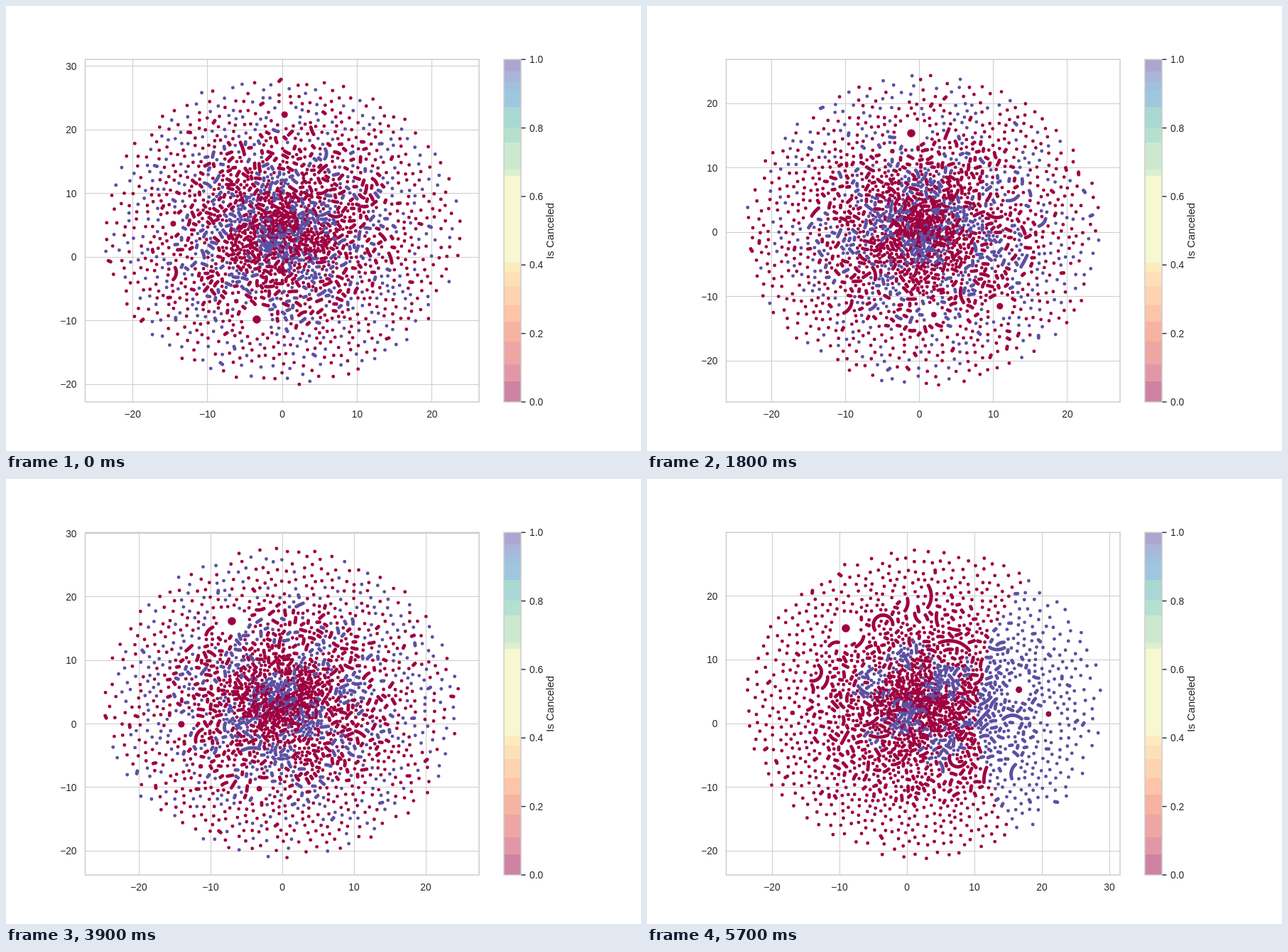
An HTML page for the animation above (6000 ms loop, 894 by 626 pixels).

```html
<!DOCTYPE html>
<html lang="en">
<head>
<meta charset="utf-8">
<title>Scatter</title>
<style>
  html, body { margin: 0; width: 100%; height: 100%; overflow: hidden; background: #fff; }
  svg { display: block; width: 894px; height: 626px; }
  text { font: 13.75px "Liberation Sans", Arial, sans-serif; fill: #262626; }
  .title { font-size: 15px; }
  .dots { fill: none; stroke-width: 4.9; stroke-linecap: round; stroke-linejoin: round; }
</style>
</head>
<body>
<svg viewBox="0 0 894 626">
  <g id="grid"></g>
  <g id="dots" class="dots"></g>
  <rect x="111.5" y="75.2" width="554.5" height="481.8" fill="none" stroke="#ccc" stroke-width="1.5"/>
  <g id="bar"></g>
  <text class="title" text-anchor="middle" transform="translate(771 316.5) rotate(-90)">Is Canceled</text>
</svg>
<script>
const STEP = 300, COUNT = 20, LAST = COUNT - 1, TAU = 2 * Math.PI;
const BOX = { l: 111.5, r: 666, t: 75.2, b: 557 };
const CLOUD = { x: 389, y: 316, rx: 251, ry: 218.5 };
const RED = '#9e0142', BLUE = '#5e4fa2';

// key poses: step, x of zero, x per ten, y of zero, y per ten, largest cluster
const POSES = [
  [0, 389, 105.4, 353, 89.5, 353, 441],
  [4, 343, 104.9, 317, 90.6, 541, 290],
  [6, 383.5, 104.2, 318, 90.5, 372, 179],
  [9, 324, 102.9, 315.5, 90.1, 409, 435],
  [13, 389, 101, 344.5, 89.3, 318, 200],
  [16, 376, 101.5, 315.5, 88.3, 265, 334],
  [19, 366, 95, 344, 89.7, 280, 210]
];

// lower edge and colour of each colour bar band
const BANDS = [
  [92, '#aba7d0'], [107, '#abb4d9'], [118, '#a0c0de'], [142, '#9ec6dc'], [171, '#a9d8d3'],
  [192, '#b5e0d0'], [230, '#cce9cf'], [239, '#dcf0d0'], [361, '#f5f8d0'], [375, '#fdeabf'],
  [394, '#fee0b6'], [421, '#fdd3b0'], [444, '#fcc4a8'], [472, '#f7b3a2'], [504, '#eea5a4'],
  [528, '#e397a6'], [557, '#ce83a2']
];

const $ = id => document.getElementById(id);
const line = (x1, y1, x2, y2, color = '#ccc', w = 1) =>
  `<path d="M${x1} ${y1}L${x2} ${y2}" stroke="${color}" stroke-width="${w}"/>`;
const label = (x, y, s, anchor = 'start') =>
  `<text x="${x}" y="${y}" text-anchor="${anchor}">${s}</text>`;
const snap = v => Math.floor(v) + .5;

function random(seed) {
  let s = seed * 7919 + 1013;
  return () => {
    s = s + 0x6D2B79F5 | 0;
    let t = Math.imul(s ^ s >>> 15, 1 | s);
    t = t + Math.imul(t ^ t >>> 7, 61 | t) ^ t;
    return ((t ^ t >>> 14) >>> 0) / 4294967296;
  };
}

function poseAt(i) {
  const k = Math.max(1, POSES.findIndex(p => p[0] >= i));
  const a = POSES[k - 1], b = POSES[k], u = (i - a[0]) / (b[0] - a[0]);
  return a.map((v, j) => v + (b[j] - v) * u);
}

function drawGrid([, x0, dx, y0, dy]) {
  let out = '';
  for (let n = -3; n <= 3; n++) {
    const name = n ? (n < 0 ? '−' : '') + Math.abs(n) * 10 : '0';
    const x = x0 + n * dx, y = y0 - n * dy;
    if (x > BOX.l && x < BOX.r)
      out += line(snap(x), BOX.t, snap(x), BOX.b) + label(x, 579, name, 'middle');
    if (y > BOX.t && y < BOX.b)
      out += line(BOX.l, snap(y), BOX.r, snap(y)) + label(99.5, y + 5, name, 'end');
  }
  return out;
}

// Buckets of points, so that only neighbours are compared.
function makeField() {
  const cells = new Map(), size = 16;
  const key = (x, y) => Math.floor(x / size) + Math.floor(y / size) * 64;
  return {
    add(p) {
      const k = key(...p);
      if (!cells.has(k)) cells.set(k, []);
      cells.get(k).push(p);
    },
    near(x, y, gap) {
      for (let j = -1; j <= 1; j++)
        for (let i = -1; i <= 1; i++)
          for (const p of cells.get(key(x, y) + i + j * 64) || [])
            if ((p[0] - x) ** 2 + (p[1] - y) ** 2 < gap * gap) return true;
      return false;
    }
  };
}

function drawDots(i, pose) {
  const rnd = random(i + 1), field = makeField(), layers = [];
  const final = i === LAST, sx = rnd() * TAU, sy = rnd() * TAU;
  const place = (q, a) => [CLOUD.x + CLOUD.rx * q * Math.cos(a), CLOUD.y + CLOUD.ry * q * Math.sin(a)];
  const radius = (x, y) => Math.hypot((x - CLOUD.x) / CLOUD.rx, (y - CLOUD.y) / CLOUD.ry);
  const gapAt = q => 2.2 + 8.5 * q ** 1.2 + 4.5 * q ** 20;

  const clusters = [[pose[5], pose[6], 5.8]];
  for (let r = 4.6; r > 3; r -= .7) clusters.push([...place(.5 + rnd() * .25, rnd() * TAU), r]);
  const inHole = (x, y) => clusters.some(([cx, cy, r]) => Math.hypot(cx - x, cy - y) < r * 3.6);

  function isBlue(x, y, q) {
    const patch = Math.sin(x / 17 + sx) * Math.sin(y / 15 + sy);
    if (final) {
      const edge = 465 + 50 * ((y - 330) / 165) ** 2;
      return x > edge || q < .4 && rnd() < .28 + .6 * patch;
    }
    return rnd() < .35 + (q < .5 ? .5 : .12) * patch;
  }

  function stepsAt(q) {
    if (q > .65) return rnd() < .05 ? 1 : 0;
    if (q > .3 && rnd() < (final ? .16 : .06)) return 3 + Math.floor(rnd() * (final ? 12 : 5));
    return Math.floor(rnd() * (q < .5 ? 3.4 : 2.4));
  }

  for (let n = 0; n < 16000; n++) {
    const q = rnd() ** .6;
    let [x, y] = place(q, rnd() * TAU);
    if (inHole(x, y) || field.near(x, y, gapAt(q))) continue;
    const color = isBlue(x, y, q) ? BLUE : RED;
    const own = [[x, y]], bend = (rnd() - .5) * .6;
    let turn = rnd() * TAU, d = `M${x.toFixed(1)} ${y.toFixed(1)}h0`;
    for (let k = stepsAt(q); k > 0; k--) {
      turn += bend;
      x += 3.6 * Math.cos(turn);
      y += 3.6 * Math.sin(turn);
      if (inHole(x, y) || field.near(x, y, gapAt(radius(x, y)) * .8)) break;
      own.push([x, y]);
      d += `L${x.toFixed(1)} ${y.toFixed(1)}`;
    }
    own.forEach(field.add);
    const layer = layers[n % 6] ||= { [BLUE]: '', [RED]: '' };
    layer[color] += d;
  }

  const paths = layers.map(l => [BLUE, RED].map(c => `<path d="${l[c]}" stroke="${c}"/>`).join(''));
  const blobs = clusters.map(([x, y, r]) => `<circle cx="${x}" cy="${y}" r="${r}" fill="${RED}"/>`);
  return paths.join('') + blobs.join('');
}

function drawBar() {
  let top = BOX.t, out = '';
  for (const [end, color] of BANDS) {
    out += `<rect x="701" y="${top}" width="24" height="${end - top}" fill="${color}" shape-rendering="crispEdges"/>`;
    top = end;
  }
  out += '<rect x="701" y="75.2" width="24" height="481.8" fill="none" stroke="#ccc" stroke-width="1.5"/>';
  for (let n = 0; n <= 5; n++) {
    const y = BOX.b - n * (BOX.b - BOX.t) / 5;
    out += line(725.5, y, 731.5, y, '#262626', 1.4) + label(737, y + 5, (n / 5).toFixed(1));
  }
  return out;
}

const cache = [];
let shown = -1;

function build(i) {
  const pose = poseAt(i);
  return { grid: drawGrid(pose), dots: drawDots(i, pose) };
}

function render(ms) {
  const i = Math.floor(ms / STEP) % COUNT;
  if (i === shown) return;
  shown = i;
  const { grid, dots } = cache[i] ||= build(i);
  $('grid').innerHTML = grid;
  $('dots').innerHTML = dots;
}

$('bar').innerHTML = drawBar();
const start = performance.now();
function tick() {
  render(performance.now() - start);
  requestAnimationFrame(tick);
}
tick();
</script>
</body>
</html>
```
